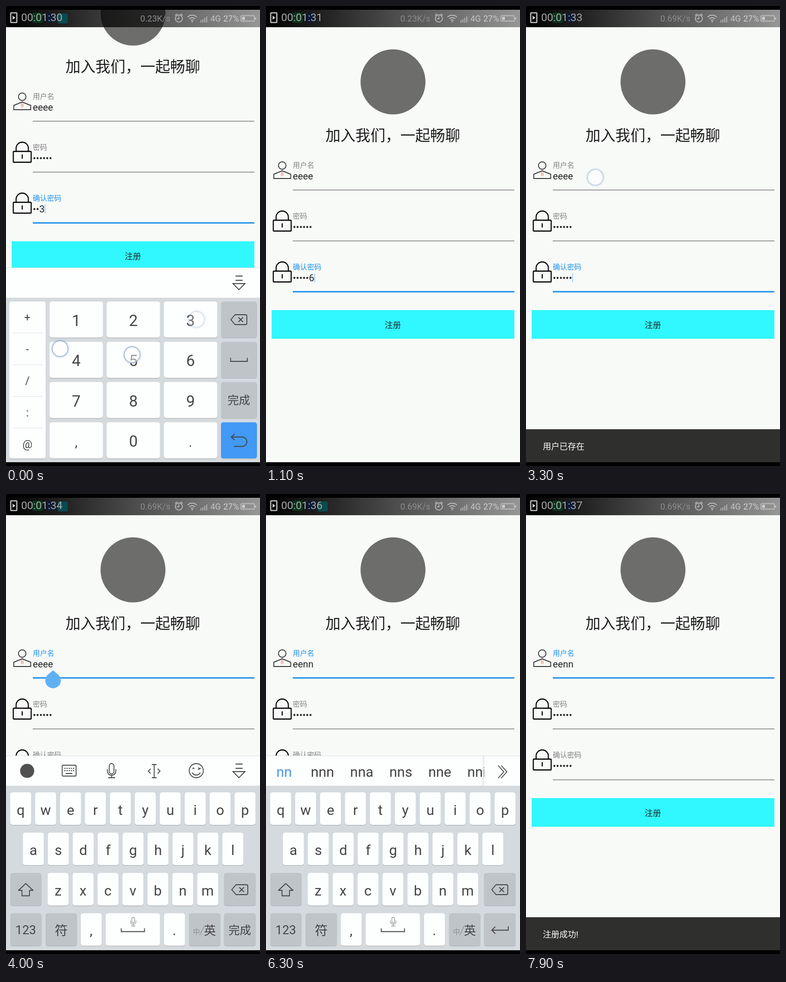
Write an HTML page that moves like this. It is 540 px wide and 976 px high and loops after 8000 ms.

```html
<!DOCTYPE html>
<html lang="zh-CN">
<head>
<meta charset="utf-8">
<title>注册</title>
<style>
html, body { margin: 0; height: 100%; overflow: hidden; background: #000; }
svg { display: block; width: 540px; height: 976px; }
text { font-family: Roboto, "Noto Sans CJK SC", "Noto Sans CJK", sans-serif; white-space: pre; }
.line { fill: none; stroke: #444; stroke-width: 1.8; }
.lock { fill: none; stroke: #000; stroke-width: 2.3; }
.user { fill: none; stroke: #3a3a3a; stroke-width: 1.9; }
.status { fill: none; stroke: #bcbcbc; stroke-width: 1.8; }
</style>
</head>
<body>
<svg id="stage" viewBox="0 0 540 976"></svg>
<script>
const LOOP = 8000, INK = '#444', BLUE = '#2090ea', GREY = '#bfc4c9', KEY = '#fdfefe';

const rect = (x, y, w, h, fill, r = 0, extra = '') =>
  `<rect x="${x}" y="${y}" width="${w}" height="${h}" rx="${r}" fill="${fill}" ${extra}/>`;
const circle = (x, y, r, attrs) => `<circle cx="${x}" cy="${y}" r="${r}" ${attrs}/>`;
const path = (d, cls = 'line', extra = '') => `<path class="${cls}" d="${d}" ${extra}/>`;
const text = (s, x, y, size, fill = INK, anchor = 'middle', id = '') =>
  `<text x="${x}" y="${y}" font-size="${size}" fill="${fill}" text-anchor="${anchor}" id="${id}">${s}</text>`;
const group = (id, body, extra = '') => `<g id="${id}" ${extra}>${body}</g>`;
const key = (x, y, w, h, fill = KEY) =>
  rect(x, y + 1.5, w, h, '#b4babf', 5) + rect(x, y, w, h, fill, 5);
const backspace = (x, y) =>
  path(`M${x - 17} ${y}l9 -10.5h22q3 0 3 3v15q0 3 -3 3h-22zM${x - 1} ${y - 5}l10 10m0 -10l-10 10`);

// ---- registration form ----
const lock = y =>
  rect(15.5, y + 9.5, 38, 23, 'none', 1.5, 'class="lock"') +
  path(`M21.5 ${y + 9}v-6a13 13 0 0 1 26 0v6M34.5 ${y + 16}v9`, 'lock');
const userIcon =
  circle(34.5, 338.5, 8, 'class="user"') +
  path('M16.5 366V357L34.5 349.5L52.5 357V366Z', 'user') +
  rect(32.5, 352, 4, 8.5, 'none', 1.5, 'stroke="#e8837c"') +
  path('M34.5 354v4', 'user', 'style="stroke:#e8837c;stroke-width:1"');
const field = (id, label, y) =>
  text(label, 57, y + 5.5, 15.19, '#808080', 'start', id + 'Label') +
  text('', 57, y + 30.7, 20.25, '#222', 'start', id + 'Text') +
  rect(57, y + 52.7, 471, 1.5, '#777', 0, `id="${id}Rule"`);

const form = group('form',
  circle(270, 161, 69, 'fill="#6d6e6c"') +
  text('加入我们，一起畅聊', 269.6, 286, 31.8, '#1d1d1d') +
  userIcon + lock(445) + lock(553) +
  field('name', '用户名', 337) + field('pass', '密码', 445) + field('again', '确认密码', 553) +
  rect(12, 645.2, 516, 60.8, '#31f7ff') +
  text('注册', 269.7, 683, 17.3, '#1d2a2a') +
  rect(0, 0, 1.3, 18.5, '#76b9f0', 0, 'id="caret"') +
  path('M100 374L111.7 384A16.5 16.5 0 1 1 88.3 384Z', '', 'id="handle" fill="#60b1f4"'));

const snack = group('snack', rect(0, 898, 540, 72, '#2f302e') +
  text('', 35.7, 941, 17.72, '#fff', 'start', 'snackText'));

// ---- keyboards ----
const collapse = path('M488 573H503M488 582H503M482.5 589H508L495.2 602Z');

function numberPad() {
  let s = key(7, 627, 77.5, 333);
  [...'+-/:@'].forEach((c, i) => {
    s += text(c, 45.5, 668.5 + 67.4 * i, 23.5);
    if (i) s += rect(14, 626 + 67.3 * i, 64, 1, '#dfe2e4');
  });
  [...'123456789,0.'].forEach((c, i) => {
    const x = 92.5 + 121.5 * (i % 3), y = 627 + 85.4 * (i / 3 | 0);
    s += key(x, y, 113.5, 76.5) + text(c, x + 56.7, y + 51.8, /\d/.test(c) ? 33 : 28);
  });
  for (let i = 0; i < 4; i++) s += key(457, 627 + 85.4 * i, 76.5, 76.5, i < 3 ? GREY : '#4299f6');
  return s + backspace(495, 665.5) + path('M477.5 746.5v7.5h35.5v-7.5') +
    text('完成', 495, 845, 24) +
    path('M479 914.5H502a10 10 0 0 1 0 20H484.5M486 908l-7 6.5l7 6.5');
}

function letterPad() {
  const rows = [['qwertyuiop', 9, 633], ['asdfghjkl', 36, 718.5], ['zxcvbnm', 88.5, 804]];
  let s = '';
  for (const [letters, x0, y] of rows)
    [...letters].forEach((c, i) => {
      const x = x0 + 53 * i;
      s += key(x, y, 44.5, 69) + text(c, x + 22.2, y + 47.7, 30);
    });
  for (const [x, y, w, fill] of [[9, 804, 66.5, GREY], [463.5, 804, 67.5, GREY], [9, 889.5, 66.5, GREY],
    [84, 889.5, 67, GREY], [159, 889.5, 44.5], [212, 889.5, 115.5], [336, 889.5, 44.5],
    [389, 889.5, 67, GREY], [463.5, 889.5, 67.5, GREY]]) s += key(x, y, w, 69, fill);
  return s + backspace(497, 839.5) +
    path('M42 826.5L57.5 841H50V852.5H34V841H26.5Z', 'line', 'stroke-linejoin="round"') +
    text('123', 42, 934, 26) + text('符', 117.5, 935.5, 27.5) +
    text(',', 181, 936, 30) + text('.', 358, 936, 30) +
    path('M245 921.5v7h49.5v-7') +
    path('M267.5 901a3 3 0 0 1 6 0v6a3 3 0 0 1 -6 0zM264.5 905v2a6 6 0 0 0 12 0v-2M270.5 913v3M266 916.5h9',
      'line', 'style="stroke:#999;stroke-width:1.3"') +
    text('中', 405, 934, 15, '#8d9195') + path('M412 936L421 917', 'line', 'style="stroke:#8d9195;stroke-width:1.2"') +
    text('英', 433.5, 935, 25.5) +
    text('完成', 497, 934, 24, INK, 'middle', 'done') +
    path('M515 917v8.5H480M487.5 918l-7.5 7.5l7.5 7.5', 'line', 'id="enter"');
}

function toolbar() {
  let dots = '';
  for (let i = 0; i < 10; i++) dots += `M${124 + 4.6 * (i % 5)} ${582 + 5 * (i / 5 | 0)}h2.5`;
  return circle(45, 587.5, 15, 'fill="#505050"') +
    rect(119.5, 575.5, 29.5, 23, 'none', 2, 'class="line"') + path(dots + 'M127 593h14') +
    path('M219.5 577a5 5 0 0 1 10 0v12a5 5 0 0 1 -10 0zM215.5 584v4a9 9 0 0 0 18 0v-4M224.5 597v5M217 602h15') +
    path('M310 574h10M315 574v28M310 602h10M307.5 583l-5 5l5 5M322.5 583l5 5l-5 5') +
    circle(404.5, 587, 15, 'class="line"') +
    path('M396 591a9.5 9.5 0 0 0 17 0M396.5 583q2 -3 4 0M408 581l5 1.5l-5 2.5');
}

const keyboard = group('keyboard',
  rect(0, 555, 540, 65, '#fdfefe') + rect(0, 555, 540, 1, '#dde0e1') +
  rect(0, 619, 540, 400, '#d4dade') +
  group('numbers', numberPad()) +
  group('letters', letterPad() + group('tools', toolbar())) + group('collapse', collapse) +
  group('candidates', group('words', '') +
    rect(458, 556, 6, 63, 'url(#edge)') + rect(464, 556, 76, 63, '#fdfefe') +
    path('M493.5 576l12 13.5l-12 13.5M500 576l12 13.5l-12 13.5')));

// ---- status bar ----
const bars = [5, 7, 10, 13, 16].map((h, i) => rect(413.5 + 4.1 * i, 35 - h, 2, h, i < 4 ? '#b4b4b4' : '#808080')).join('');
const status =
  rect(0, 8, 540, 37, 'url(#shade)') +
  rect(56, 14, 22, 22, '#06351a', 4) + rect(86, 15, 18, 20, '#0c1b36', 4) +
  rect(110, 16, 21, 21, '#0b4a53', 3, 'id="imeIcon"') +
  rect(10, 14.5, 13, 20.5, 'none', 1, 'class="status" style="stroke-width:2.6"') +
  path('M14 20.5L20 24.8L14 29Z', '', 'fill="#ccc"') +
  text('', 32.2, 32.3, 22.78, '#a9a9a9', 'start', 'clock') +
  text('', 285.5, 33, 18.2, '#8d8d8d', 'start', 'speed') +
  circle(367.5, 26.5, 7.5, 'class="status"') + path('M367.5 22v5h-4M359.5 20l4 -3.5M375.5 20l-4 -3.5', 'status') +
  path('M386 23.5a14.5 14.5 0 0 1 20 0M389.5 27.3a9.5 9.5 0 0 1 13 0M392.8 30.7a5 5 0 0 1 6.4 0', 'status') +
  circle(396, 33, 1.6, 'fill="#bcbcbc"') + bars +
  text('4G', 434.5, 33, 18, '#c4c4c4', 'start') + text('27%', 462, 33, 18, '#cfcfcf', 'start') +
  rect(499.5, 20.5, 28.5, 11.5, 'none', 1, 'class="status"') +
  rect(502, 23, 6, 6.5, '#ccc') + rect(529, 24, 3, 5, '#bcbcbc');

// x, y, press time, release time
const touches = [
  [405, 665, -300, -85], [115, 727, -160, 80], [268, 740, -120, 150], [392, 745, 250, 350],
  [495, 836, 560, 640], [390.5, 679, 1450, 1588], [147.5, 363.5, 3220, 3420],
  [505, 837, 4750, 4920], [505, 837, 5150, 5300], [375, 840, 5650, 5780], [375, 840, 6010, 6130],
  [503, 918, 6370, 6500], [503, 918, 6640, 6760], [390.5, 679, 7260, 7390]];

const stage = document.getElementById('stage');
stage.innerHTML = `<defs>
  <linearGradient id="shade"><stop stop-color="#000"/><stop offset="1" stop-color="#000" stop-opacity=".4"/></linearGradient>
  <linearGradient id="edge"><stop stop-color="#000" stop-opacity="0"/><stop offset="1" stop-color="#000" stop-opacity=".1"/></linearGradient>
  </defs>` + rect(0, 0, 540, 976, '#f8faf8') + form + snack + keyboard + status +
  touches.map(([x, y]) => `<g class="touch">` +
    circle(x, y, 17.5, 'fill="none" stroke="#9bb4d0" stroke-opacity=".25" stroke-width="5"') +
    circle(x, y, 16.8, 'fill="#fff" fill-opacity=".5" stroke="#8faac4" stroke-opacity=".75" stroke-width="1.8"') +
    '</g>').join('') +
  rect(0, 0, 540, 8, '#000') + rect(0, 968, 540, 8, '#000');

const el = id => document.getElementById(id);
const show = (id, on) => el(id).setAttribute('visibility', on ? 'visible' : 'hidden');
const set = (node, attrs) => { for (const k in attrs) node.setAttribute(k, attrs[k]); };
const write = (id, s) => { if (el(id).textContent !== s) el(id).textContent = s; };
const ramp = (t, a, b) => Math.min(1, Math.max(0, (t - a) / (b - a)));
const smooth = p => p * p * (3 - 2 * p);
const within = (t, a, b) => t >= a && t < b;
const stepAt = (t, steps) => steps.filter(s => t >= s[0]).pop()[1];
const touchDots = [...document.querySelectorAll('.touch')];

function drawWords(typed) {
  if (el('words').dataset.typed === typed) return;
  el('words').dataset.typed = typed;
  el('words').innerHTML = ['', 'n', 'a', 's', 'e', 'i']
    .map((end, i) => text(typed + end, 0, 600, 30, i ? INK : '#4a98ee', 'start')).join('');
  let x = 22;
  [...el('words').children].forEach((word, i) => {
    word.setAttribute('x', x);
    x += word.getComputedTextLength() + (i ? 34 : 40);
  });
}

function update(t) {
  const onName = t >= 3500, letters = t >= 3000;
  write('clock', '00:01:' + (30 + Math.floor(t / 1000)));
  write('speed', t < 2000 ? '0.23K/s' : '0.69K/s');

  set(el('form'), { transform: `translate(0 ${-146 * (1 - smooth(ramp(t, 675, 940)))})` });
  write('nameText', stepAt(t, [[0, 'eeee'], [4900, 'eee'], [5250, 'ee'], [5750, 'een'], [6100, 'eenn']]));
  write('passText', '••••••');
  write('againText', stepAt(t, [[0, '••3'], [110, '•••4'], [200, '••••5'], [340, '•••••6'], [1600, '••••••']]));
  for (const [id, y] of [['name', 389.7], ['again', 605.7]]) {
    const focus = (id === 'name') === onName;
    set(el(id + 'Label'), { fill: focus ? BLUE : '#808080' });
    set(el(id + 'Rule'), { y: focus ? y - 1 : y, height: focus ? 3 : 1.5, fill: focus ? BLUE : '#777' });
  }
  const active = el(onName ? 'nameText' : 'againText');
  set(el('caret'), { x: 57.2 + active.getComputedTextLength(), y: onName ? 351.5 : 567.5 });
  show('caret', onName ? Math.floor((t + 150) / 500) % 2 === 1 : Math.floor(t / 500) % 2 === 0);
  set(el('handle'), { opacity: ramp(t, 3500, 3600) - ramp(t, 4400, 4600) });

  const rise = smooth(ramp(t, 1612, 1862)) - smooth(ramp(t, 3380, 3630)) + smooth(ramp(t, 7450, 7700));
  set(el('snack'), { transform: `translate(0 ${70 * (1 - rise)})` });
  write('snackText', t < 5000 ? '用户已存在' : '注册成功!');
  set(el('snackText'), { opacity: ramp(t, 1780, 2000) - ramp(t, 3380, 3500) + ramp(t, 7610, 7830) });

  const up = 1 - ramp(t, 690, 820) + ramp(t, 3650, 3850) - ramp(t, 6850, 6980);
  set(el('keyboard'), { opacity: up, transform: `translate(0 ${34 * (1 - up)})` });
  show('imeIcon', up > .5);
  show('numbers', !letters);
  const composing = within(t, 5750, 6450);
  for (const id of ['letters', 'tools', 'done', 'enter', 'candidates', 'collapse'])
    show(id, id === 'letters' ? letters
      : id === 'collapse' ? !composing
      : letters && composing === (id === 'enter' || id === 'candidates'));
  if (composing) drawWords(t < 6100 ? 'n' : 'nn');

  touches.forEach(([, , a, b], i) =>
    set(touchDots[i], { opacity: ramp(t, a, a + 120) - ramp(t, b, b + 160) }));
}

const start = performance.now();
function tick() {
  update((performance.now() - start) % LOOP);
  requestAnimationFrame(tick);
}
tick();
</script>
</body>
</html>
```
